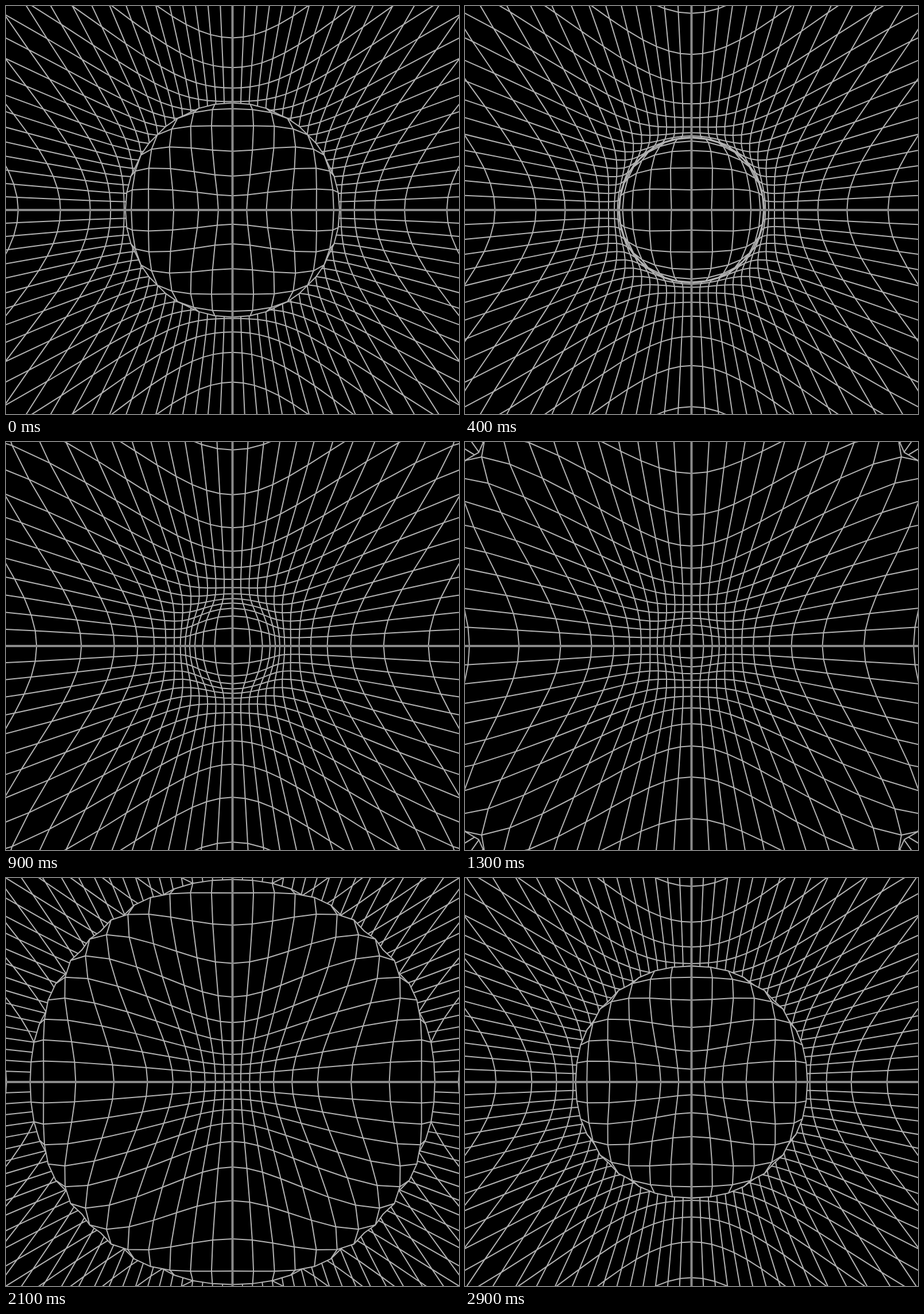
Write an HTML page with a canvas that moves like this. It is 789 px wide and 710 px high and loops after 3 s.

```html
<!DOCTYPE html>
<html lang="en">
<head>
<meta charset="utf-8">
<title>Ripple grid</title>
<style>
html, body { margin: 0; width: 100%; height: 100%; overflow: hidden; background: #000; }
canvas { display: block; }
</style>
</head>
<body>
<canvas id="stage" width="789" height="710"></canvas>
<script>
const W = 789, H = 710, CX = 394.5, CY = 355;
const LOOP = 3000, STEP = 100;
const CELL = 36.6;    // cell size at the wave crest
const WAVE = 16.65;   // wavelength in cells
const SWELL = 0.768;  // depth of the wave
const N = 27;         // cells from the centre to the rim

const ctx = document.getElementById('stage').getContext('2d');

// One quadrant of cells, far cells first so that nearer ones cover them.
const cells = [];
for (let i = 0; i < N; i++) {
  for (let j = 0; j < N; j++) {
    const dist = Math.hypot(i + 0.5, j + 0.5);
    if (dist < N) cells.push({ i, j, dist });
  }
}
cells.sort((a, b) => b.dist - a.dist);

// A radial sine wave in depth, seen from above in perspective.
function scaleAt(radius, time) {
  const phase = 2 * Math.PI * (radius / WAVE + time / LOOP);
  return CELL / (1 + SWELL * (1 - Math.sin(phase)));
}

function project(time) {
  const points = [];
  for (let i = 0; i <= N; i++) {
    points.push([]);
    for (let j = 0; j <= N; j++) {
      const k = scaleAt(Math.hypot(i, j), time);
      points[i].push([i * k, j * k]);
    }
  }
  return points;
}

function drawCell(points, { i, j }, sx, sy) {
  const at = (a, b) => [CX + sx * points[a][b][0], CY + sy * points[a][b][1]];
  const inner = at(i, j), right = at(i + 1, j);
  const outer = at(i + 1, j + 1), below = at(i, j + 1);
  ctx.beginPath();
  ctx.moveTo(...inner);
  ctx.lineTo(...right);
  ctx.lineTo(...outer);
  ctx.lineTo(...below);
  ctx.fill();
  ctx.beginPath();
  ctx.moveTo(...right);
  ctx.lineTo(...outer);
  ctx.lineTo(...below);
  ctx.stroke();
}

function draw(time) {
  const points = project(time);
  ctx.fillStyle = '#000';
  ctx.fillRect(0, 0, W, H);
  ctx.strokeStyle = '#b2b2b2';
  ctx.lineWidth = 2;
  ctx.lineJoin = 'round';
  for (const cell of cells) {
    for (const sx of [-1, 1]) {
      for (const sy of [-1, 1]) drawCell(points, cell, sx, sy);
    }
  }
  ctx.fillStyle = '#8a8a8a';
  ctx.fillRect(0, CY - 2, W, 4);
  ctx.fillRect(CX - 2, 0, 4, H);
}

const start = performance.now();
let shown = -1;
function frame() {
  const time = Math.floor(((performance.now() - start) % LOOP) / STEP) * STEP;
  if (time !== shown) draw(shown = time);
  requestAnimationFrame(frame);
}
frame();
</script>
</body>
</html>
```
